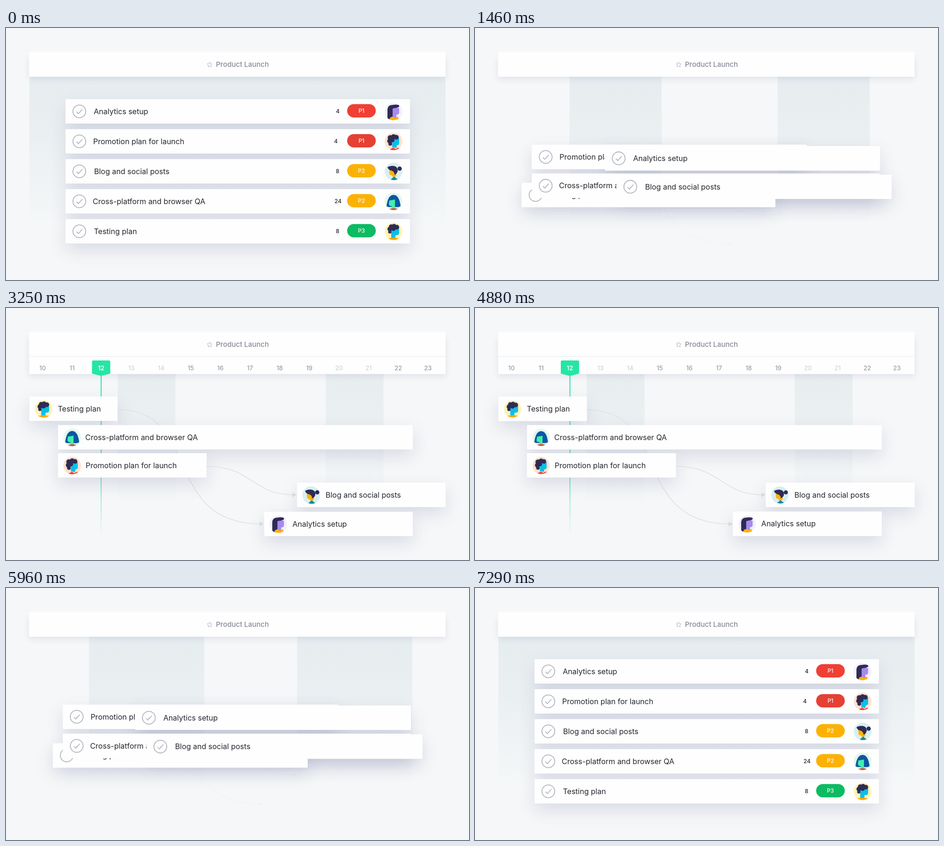
An HTML page with a canvas for the animation above (7.33 s loop, 988 by 538 pixels).

```html
<!DOCTYPE html>
<html lang="en">
<head>
<meta charset="utf-8">
<title>Product Launch</title>
<style>
  html, body { margin: 0; width: 100%; height: 100%; overflow: hidden; background: #f5f7f8; }
  canvas { display: block; width: 988px; height: 538px; }
</style>
</head>
<body>
<canvas id="stage" width="988" height="538"></canvas>
<script>
const ctx = document.getElementById('stage').getContext('2d');
const LOOP = 7330, TURN = 3735, MOVE = 2290;
const GROUND = '#f5f7f8', PAPER = '#fefefe', INK = '#25262e', NAVY = '#2f2b56', MINT = '#25e6a4';
const FONT = 'Inter, "Open Sans", sans-serif';

// from / to: [left, right, top]; the list runs from the top row down
const rows = [
  { title: 'Analytics setup', indent: 60.3, from: [127, 862, 152], to: [551, 868, 435],
    hours: '4', hoursX: 708, label: 'P1', fill: '#f03f35', face: 'long' },
  { title: 'Promotion plan for launch', indent: 59, from: [127, 862, 216], to: [111, 428, 310],
    hours: '4', hoursX: 704, label: 'P1', fill: '#e64035', face: 'curly' },
  { title: 'Blog and social posts', indent: 61, from: [127, 862, 280], to: [621, 938, 373],
    hours: '8', hoursX: 707.5, label: 'P2', fill: '#fcb204', face: 'bun' },
  { title: 'Cross-platform and browser QA', indent: 58, from: [127, 862, 344], to: [111, 868, 250],
    hours: '24', hoursX: 708.5, label: 'P2', fill: '#fcb204', face: 'bob' },
  { title: 'Testing plan', indent: 60.5, from: [127, 862, 408], to: [50, 238, 189],
    hours: '8', hoursX: 707.5, label: 'P3', fill: '#0cbb62', face: 'short' }
];

const clamp = v => Math.max(0, Math.min(1, v));
const mix = (a, b, k) => a + (b - a) * k;
const smooth = u => u * u * (3 - 2 * u);
const expo = u => u <= 0 ? 0 : u >= 1 ? 1 :
  u < .5 ? 2 ** (20 * u - 11) : 1 - 2 ** (9 - 20 * u);
const ramp = (t, start, length, ease = smooth) => ease(clamp((t - start) / length));

function text(str, x, y, size, color, weight = 400, align = 'left') {
  ctx.font = `${weight} ${size}px ${FONT}`;
  ctx.textAlign = align;
  ctx.textBaseline = 'alphabetic';
  ctx.fillStyle = color;
  ctx.fillText(str, x, y + size * .36);
}

function box(x, y, w, h, r, color) {
  ctx.fillStyle = color;
  ctx.beginPath();
  ctx.roundRect(x, y, w, h, r);
  ctx.fill();
}

function disc(x, y, r, color) {
  ctx.fillStyle = color;
  ctx.beginPath();
  ctx.arc(x, y, r, 0, 7);
  ctx.fill();
}

function shape(d, color) {
  ctx.fillStyle = color;
  ctx.fill(new Path2D(d));
}

function withShadow(color, blur, y, draw) {
  ctx.save();
  ctx.shadowColor = color;
  ctx.shadowBlur = blur;
  ctx.shadowOffsetY = y;
  draw();
  ctx.restore();
}

function curls(points) {
  points.forEach(([x, y, r]) => disc(x, y, r, NAVY));
}

const faces = {
  long() {
    disc(0, 0, 19, '#f3f0fc');
    shape('M-13 17V-5Q-12-14-2-14Q8-16 12-13Q13-9 7-8L4 17Z', NAVY);
    shape('M-2-6Q4-9 12-7V2Q12 7 6 7V13H-2Z', '#a68bee');
    shape('M-9 17Q-7 11-2 11L5 14 8 10Q11 13 11 16Q0 21-9 17Z', '#ffb20a');
  },
  curly() {
    disc(0, 0, 19, '#ffe2cc');
    shape('M-2-5L12-8V4Q12 8 7 8L6 14-3 12Z', '#09bfe6');
    curls([[-8, -1, 5.5], [-7, -8, 5.5], [0, -10, 5.5], [6, -9, 5], [-3, -3, 5], [-7, 5, 4]]);
    shape('M-8 17L-1 13 5 16 10 13 12 15Q2 21-8 17Z', '#f34636');
  },
  bun() {
    disc(0, 0, 19, '#d8eff3');
    shape('M-9-4L7-2 6 8 2 14-5 8Q-9 8-9 3Z', '#ffb20a');
    shape('M-13-9Q-9-12-1-12Q9-11 9-2Q8 5 2 7Q2 0-5-2Q-11-3-13-9Z', NAVY);
    disc(13, -6, 4.5, NAVY);
    shape('M-6 17L1 11 9 17Q2 20-6 17Z', '#148aa5');
  },
  bob() {
    disc(0, 0, 19, '#e2f8ee');
    shape('M-15 10Q-12-14 0-14Q12-14 15 10Q11 13 5 12H-9Q-13 12-15 10Z', '#0b57a3');
    shape('M-9-2L3-4V12L5 16H-4V10Q-10 10-10 5Z', '#3ff0aa');
    shape('M-9 16Q0 13 9 16Q0 21-9 16Z', '#e5453b');
  },
  short() {
    disc(0, 0, 19, '#fff3b4');
    shape('M-8-6H12V3Q12 8 6 8H4V15H-5V2Z', '#09bfe6');
    curls([[-8, -5, 5], [-5, -10, 5], [1, -11, 5], [7, -9, 5], [0, -6, 5], [-8, 1, 3.5]]);
    shape('M-12 15Q0 12 12 15Q0 22-12 15Z', '#ffa60a');
  }
};

function avatar(kind, x, y, scale) {
  if (scale < .01) return;
  ctx.save();
  ctx.translate(x, y);
  ctx.scale(scale, scale);
  ctx.beginPath();
  ctx.arc(0, 0, 19, 0, 7);
  ctx.clip();
  faces[kind]();
  ctx.restore();
}

function checkRing(x, y, ring, check) {
  ctx.save();
  ctx.strokeStyle = '#b3b5c2';
  ctx.lineWidth = 1.8;
  ctx.globalAlpha = ring;
  ctx.beginPath();
  ctx.arc(x, y, 13.7, 0, 7);
  ctx.stroke();
  ctx.globalAlpha = check;
  ctx.stroke(new Path2D(`M${x - 6} ${y + 1}l4 4 8.5-9.5`));
  ctx.restore();
}

function weekends(q) {
  const grad = ctx.createLinearGradient(0, 104, 0, 420);
  grad.addColorStop(0, '#e6edef');
  grad.addColorStop(.4, '#e8eef0d8');
  grad.addColorStop(1, '#e8eef000');
  ctx.fillStyle = grad;
  const half = mix(250, 61.5, q);
  ctx.beginPath();
  [300, 744].forEach(c => {
    const left = Math.max(50, c - half), right = Math.min(938, c + half);
    ctx.rect(left, 104, right - left, 400);
  });
  ctx.fill();
}

function connectors(p) {
  ctx.save();
  ctx.globalAlpha = clamp((p - .25) / .6);
  ctx.strokeStyle = '#d9dee1';
  ctx.lineWidth = 1.2;
  ctx.stroke(new Path2D('M238 217C420 217 330 461 545 461M428 338C525 338 525 399 615 399'));
  shape('M541 456L550 461 541 466ZM611 394L620 399 611 404Z', '#dce1e4');
  ctx.restore();
}

function header(p) {
  const lift = 58 * (1 - p);
  withShadow('rgba(90,100,140,.14)', 14, 5, () => {
    box(49.5, 60, 888.5, Math.max(44, 81 - lift), 2, PAPER);
  });
  for (let day = 10; day < 24; day++) {
    const off = [13, 14, 20, 21].includes(day);
    text(day, 78 + (day - 10) * 63.25, 128 - lift, 13, off ? '#d0d3d8' : '#9a9ca8', 500, 'center');
  }
  box(49.5, 51, 888.5, 53, 2, PAPER);

  const half = 444 * clamp((p - .896) / .08);
  if (half) {
    ctx.strokeStyle = '#e6e9eb';
    ctx.lineWidth = 1;
    ctx.stroke(new Path2D(`M${494 - half} 103.5H${494 + half}`));
  }

  ctx.strokeStyle = '#b4b5c0';
  ctx.lineWidth = 1;
  ctx.beginPath();
  for (let i = 0; i < 10; i++) {
    const r = i % 2 ? 2.8 : 5.8, a = i * Math.PI / 5 - Math.PI / 2;
    ctx.lineTo(434.5 + r * Math.cos(a), 78.3 + r * Math.sin(a));
  }
  ctx.closePath();
  ctx.stroke();
  text('Product Launch', 448, 78, 15, '#898a98', 500);
}

function markerLine(x) {
  const grad = ctx.createLinearGradient(0, 145, 0, 485);
  grad.addColorStop(0, MINT);
  grad.addColorStop(.65, '#46e6aecc');
  grad.addColorStop(1, '#46e6ae00');
  ctx.fillStyle = grad;
  ctx.fillRect(x - 1, 140, 2, 345);
}

function marker(x, p) {
  box(x - 19.5, 112, 39, 28, 3, MINT);
  shape(`M${x - 19.5} 137H${x + 19.5}V140L${x} 145 ${x - 19.5} 140Z`, MINT);
  ctx.globalAlpha = clamp((p - .97) / .03);
  text('12', x, 128, 13, PAPER, 600, 'center');
  ctx.globalAlpha = 1;
}

function details(row, i, t) {
  const shown = 1 - ramp(t, 40 + i * 40, 440) + ramp(t, 6670 + i * 40, 440);
  if (shown < .01) return;
  const y = row.from[2] + 24.7;
  ctx.save();
  ctx.globalAlpha = shown;
  text(row.hours, row.hoursX, y + .5, 12, INK, 500, 'center');
  ctx.globalAlpha = 1;
  ctx.translate(758.5, y);
  ctx.scale(shown, shown);
  box(-30.5, -14.3, 61, 28.6, 14.3, row.fill);
  text(row.label, 0, 0, 12, '#fff6ee', 500, 'center');
  ctx.restore();
  avatar(row.face, 827, y + 1.5, shown);
}

function draw(t) {
  const there = t < TURN;
  const p = there ? ramp(t, 373, MOVE, expo) : 1 - ramp(t, 4757, MOVE, expo);
  const q = there ? ramp(t, 160, MOVE, expo) : 1 - ramp(t, 4887, MOVE, expo);
  const swap = there ? ramp(t, 1520, 240) : 1 - ramp(t, 5750, 250);
  const grow = there ? ramp(t, 2050, 450) : 1 - ramp(t, 4800, 450);
  const markerX = mix(-190, 203, p);

  ctx.fillStyle = GROUND;
  ctx.fillRect(0, 0, 988, 538);
  weekends(q);
  connectors(p);
  markerLine(markerX);
  header(p);
  marker(markerX, p);

  const cards = rows.map((row, i) => {
    const [left, right, top] = row.from.map((v, k) => mix(v, row.to[k], p));
    return { row, i, left, top, width: right - left };
  }).reverse();
  const sheet = c => box(c.left, c.top, c.width, 52, 2, PAPER);

  // all shadows lie below all cards
  withShadow('rgba(75,80,135,.17)', 36, 14, () => cards.forEach(sheet));
  cards.forEach(c => {
    sheet(c);
    const x = c.left + 29.5, y = c.top + 26;
    avatar(c.row.face, x + grow * .7, y + .5, mix(.72 * swap, 1, grow));
    checkRing(x, y, 1 - grow, 1 - swap);
    text(c.row.title, c.left + c.row.indent, y, 16, INK);
    details(c.row, c.i, t);
  });
}

function tick(now) {
  draw(now % LOOP);
  requestAnimationFrame(tick);
}
tick(performance.now());
</script>
</body>
</html>
```
